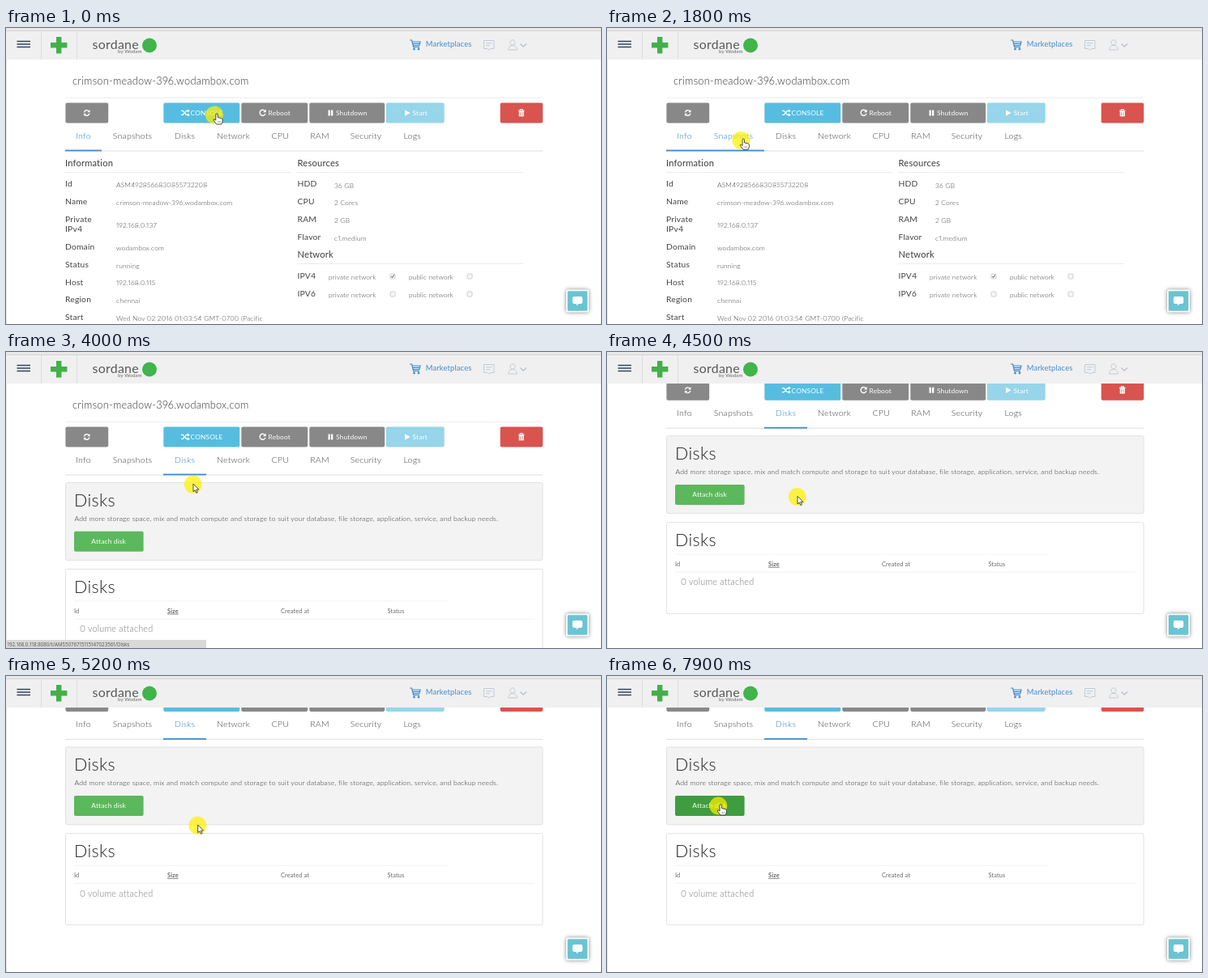
Recreate the animation shown at these times as an HTML page. Size 734 by 366 pixels, loop 8000 ms.

```html
<!DOCTYPE html>
<html lang="en">
<head>
<meta charset="utf-8">
<title>Machine console</title>
<style>
html, body { margin: 0; width: 100%; height: 100%; overflow: hidden; background: #fff; }
svg { display: block; width: 100vw; height: 100vh; }
text {
  font-family: Lato, "Open Sans", sans-serif;
  font-variant-numeric: proportional-nums;
  letter-spacing: .018em;
  white-space: pre;
}
.light { font-weight: 300; }
.glow { filter: drop-shadow(0 0 2.5px rgba(0, 0, 0, .5)); }
#bar text { font-family: "Open Sans", sans-serif; letter-spacing: 0; }
</style>
</head>
<body>
<svg id="stage" viewBox="0 0 734 366"></svg>
<script>
const LOOP = 8000;
const BLUE = '#428bca';
const TAB_BLUE = '#2f7fc4';
const GREEN = '#5cb85c';
const HOST = 'crimson-meadow-396.wodambox.com';
const LINK = '192.168.0.118:8080/t/AMS5076715115147023561/';

// Markup helpers
const text = (x, y, size, str, fill = '#555', more = '') =>
  `<text x="${x}" y="${y}" font-size="${size}" fill="${fill}" ${more}>${str}</text>`;
const light = (x, y, size, str, fill = '#555', more = '') =>
  text(x, y, size, str, fill, `class="light" ${more}`);
const rect = (x, y, w, h, fill, more = '') =>
  `<rect x="${x}" y="${y}" width="${w}" height="${h}" fill="${fill}" ${more}/>`;
const path = (d, stroke, width = 1, fill = 'none', more = '') =>
  `<path d="${d}" stroke="${stroke}" stroke-width="${width}" fill="${fill}" ${more}/>`;
const rule = (x1, x2, y, color = '#e8e8e8') => path(`M${x1} ${y}H${x2}`, color, .8);
const group = (id, body) => `<g id="${id}">${body}</g>`;
const $ = id => document.getElementById(id);

const TABS = [
  ['Info', 73, 118, 95.5], ['Snapshots', 118, 194, 156], ['Disks', 194, 247, 220.5],
  ['Network', 247, 314, 280.5], ['CPU', 314, 363, 338.3], ['RAM', 363, 412, 387],
  ['Security', 412, 477, 444], ['Logs', 477, 526, 501.3]
];

function refreshIcon(x, y) {
  return path(`M${x - 3.3} ${y - .7}a3.4 3.4 0 0 1 6-1.3M${x + 3.3} ${y + .7}a3.4 3.4 0 0 1-6 1.3`, '#fff', 1.3) +
    path(`M${x + 3.8} ${y - 4}v3.2h-3.2zM${x - 3.8} ${y + 4}v-3.2h3.2z`, 'none', 0, '#fff');
}

function buttons() {
  const box = (x1, x2, fill) => rect(x1, 92.6, x2 - x1, 25, fill, 'rx="2"');
  return box(73.4, 126.2, '#888') + box(194.3, 288.3, '#56bde0') + box(290.3, 372.2, '#888') +
    box(374.3, 467.2, '#888') + box(468.8, 540.7, '#96d5ea') + box(609.7, 662.2, '#d9534f') +
    refreshIcon(99.7, 105) +
    path('M216 102.4h2.2l4.4 5h2.2M216 107.4h2.2l4.4-5h2.2', '#fff', 1.3) +
    path('M224 100.2l2.8 2.2-2.8 2.2zM224 105.2l2.8 2.2-2.8 2.2z', 'none', 0, '#fff') +
    text(227.5, 108.4, 8.4, 'CONSOLE', '#fff') +
    path('M319.4 102.6a3.5 3.5 0 1 0 .6 3.3', '#fff', 1.4) +
    path('M320.7 100.5v3.7h-3.7z', 'none', 0, '#fff') +
    text(323.5, 108.4, 8.4, 'Reboot', '#fff') +
    rect(397.5, 101.5, 2.3, 7, '#fff') + rect(401, 101.5, 2.3, 7, '#fff') +
    text(407, 108.4, 8.4, 'Shutdown', '#fff') +
    path('M492 101.3l6.6 3.7-6.6 3.7z', 'none', 0, '#fff') +
    text(501.5, 108.4, 8.4, 'Start', '#fff') +
    path('M632 102.2h7.6M634.3 102v-1.3h3V102', '#fff', 1.1) +
    path('M632.7 103h6.2v6.3h-6.2z', 'none', 0, '#fff') +
    path('M634.6 104.2v4M637 104.2v4', '#d9534f', .7);
}

function infoPage() {
  const label = (x, y, str) => text(x, y - .5, 10.3, str, '#444');
  const value = (x, y, str) => light(x, y - .3, 8.45, str, '#444');
  const left = [
    ['Id', 196.5, 'ASM4928566830855732208', 197.7], ['Name', 218.5, HOST, 219.5],
    ['Private', 240.5, '192.168.0.137', 247.2], ['IPv4', 252, '', 0],
    ['Domain', 274.5, 'wodambox.com', 275.2], ['Status', 296.3, 'running', 297],
    ['Host', 318, '192.168.0.115', 318.7], ['Region', 339.8, 'chennai', 340.7],
    ['Start', 361.5, 'Wed Nov 02 2016 01:03:54 GMT-0700 (Pacific', 362], ['Time', 373, '', 0]
  ];
  const right = [['HDD', '36 GB'], ['CPU', '2 Cores'], ['RAM', '2 GB'], ['Flavor', 'c1.medium']];
  const check = (x, y) => rect(x - 3, y - 3, 6, 6, '#f6f6f6', 'stroke="#c4c4c4" stroke-width=".8" rx="1"');
  const net = (name, y) => label(359.5, y + 3.5, name) +
    light(398, y + 4, 8.25, 'private network', '#444') + check(477, y) +
    light(497, y + 4, 8.25, 'public network', '#444') + check(572, y);
  return text(73, 171, 11.1, 'Information', '#3d3d3d') + text(359.5, 171, 11.2, 'Resources', '#3d3d3d') +
    rule(73, 351, 178.5) + rule(359, 638, 178.5) +
    left.map(([a, y, b, v]) => label(73, y, a) + value(136, v, b)).join('') +
    right.map(([a, b], i) => label(359.5, 196.5 + 21.9 * i, a) + value(405, 197.8 + 21.8 * i, b)).join('') +
    text(359.5, 284.3, 11.2, 'Network', '#3d3d3d') + rule(359, 638, 291.5) +
    net('IPV4', 307) + net('IPV6', 329) +
    path('M475.3 307l1.3 1.5 2.2-3.2', '#555', 1);
}

function disksPage() {
  const panel = (y, h, fill) => rect(73.5, y, 588.5, h, fill, 'stroke="#e2e2e2" stroke-width="1" rx="2"');
  const head = (x, str, more) => text(x, 322.7, 7.4, str, '#666', more);
  return panel(161.5, 96, '#f3f3f3') + panel(268.5, 113, '#fff') +
    light(84, 190.7, 21.4, 'Disks', '#222') + light(84, 298.2, 21.4, 'Disks', '#222') +
    light(84.5, 209.2, 8.65, 'Add more storage space, mix and match compute and storage to suit your database, file storage, application, service, and backup needs.', '#333') +
    rect(84, 221.8, 85.6, 25, GREEN, 'id="attach" rx="2"') +
    text(126.7, 237, 8.4, 'Attach disk', '#fff', 'text-anchor="middle"') +
    rule(84, 545, 308, '#f0f0f0') + rule(84, 652, 330, '#eee') +
    head(84, 'Id') + head(199, 'Size', 'font-weight="700" text-decoration="underline"') +
    head(339, 'Created at') + head(470.5, 'Status') +
    light(91, 346.3, 10.8, '0 volume attached', '#777');
}

function header() {
  return rect(0, 0, 734, 39, '#f0f0f0') + rect(0, 0, 734, 3, '#e9e9e9') + rule(0, 734, 3.5, '#cfcfcf') +
    path('M43.5 4V39M87.5 4V39', '#dcdcdc', 1) +
    path('M13.5 16.5H30M13.5 20H30M13.5 23.5H30', '#34435a', 1.7) +
    path('M65.2 11V31.4M55 21.2H75.4', '#43b049', 6.4) +
    text(106.5, 25.7, 15.9, 'sordane', '#58595b') + text(138, 31.3, 6.1, 'by Wodam', '#666') +
    '<circle cx="177" cy="21.5" r="9" fill="#3fb54a"/>' +
    path('M498 15h2.6l2 8.5h7.4M501 17h10l-1.2 4.7h-7.7M501.5 19.3h9', BLUE, 1.2) +
    `<circle cx="503.5" cy="26" r="1.4" fill="${BLUE}"/><circle cx="509" cy="26" r="1.4" fill="${BLUE}"/>` +
    text(517.7, 23.4, 9.35, 'Marketplaces', BLUE) +
    path('M589.5 15.5h12.5v10h-4l-2.2 1.7-2.2-1.7h-4.1zM592 18.7h7.5M592 21.7h5', '#c3cbd6', 1) +
    path('M625 14.7a3 3.2 0 1 1-.1 0M619.7 27c0-4 2.5-5.5 5.3-5.5s5.3 1.5 5.3 5.5z', '#c3cbd6', 1) +
    path('M634.5 19.5l3.7 3.7 3.7-3.7', '#b5bfcc', 1.3);
}

function chat() {
  return rect(691, 323.5, 28, 28, '#fff', 'class="glow" rx="2.5"') +
    rect(692.7, 325.2, 24.6, 24.6, '#6ac4d2', 'rx="1"') +
    path('M701 332h8q2.2 0 2.2 2.2v4.5q0 2.2-2.2 2.2h-2.5l-2.7 2.7v-2.7H701q-2.2 0-2.2-2.2v-4.5q0-2.2 2.2-2.2z', 'none', 0, '#fff');
}

function pointer() {
  const halo = '<circle id="halo" r="10.9" fill="#fff000" opacity=".72"/>';
  const ring = '<circle id="ring" cx="-.8" cy="-1.2" r="9.3" fill="#fff" fill-opacity=".35" stroke="#a5a28a" stroke-width=".9"/>';
  const hand = path('M-1.2 1a1.2 1.2 0 0 1 2.4 0V4.6l4.3.9q1.7.4 1.6 2V9.8L5.8 13H-.3L-3.9 8.3q-.6-1.5.9-1.4l1.8 1.2z', '#222', .8, '#fff') +
    path('M2 9v2M4 9v2', '#444', .6);
  const arrow = path('M0 0V9.7l2.2-2 1.6 3.6 1.6-.7-1.6-3.5h3.1z', '#222', .8, '#fff');
  const beam = path('M-2-4.5H2M0-4.5V4.5M-2 4.5H2', '#222', 1.1);
  return group('cursor', halo + ring + group('hand', hand) + group('arrow', arrow) + group('beam', beam));
}

$('stage').innerHTML =
  rect(0, 0, 734, 366, '#fff') +
  group('page',
    light(82, 70, 12.8, HOST, '#333') + rule(73.5, 662, 86.3) + buttons() +
    TABS.map(([name, , , mid], i) => light(mid, 137, 10.6, name, '#444', `id="tab${i}" text-anchor="middle"`)).join('') +
    rule(73, 662, 152, '#d6d6d6') +
    TABS.map(([, a, b], i) => rect(a, 150.6, b - a, 1.8, BLUE, `id="line${i}"`)).join('') +
    group('info', infoPage()) + group('disks', disksPage())) +
  path('M.5 39V366', '#e8e8e8', 1) + header() +
  group('bar', rect(0, 356, 247, 10, '#d9d9d9') + text(1.5, 364, 6.2, '', '#555', 'id="url"')) +
  chat() + pointer();

// Pointer stops: time, x, y
const PATH = [
  [0, 260, 106], [300, 260, 106], [1700, 168.3, 137.3], [1900, 168.3, 137.3], [2500, 218.5, 135],
  [3900, 218.5, 135], [4000, 231, 163], [4700, 236, 182], [5500, 237, 185],
  [6200, 184, 271], [6600, 184, 271], [7500, 140.3, 159], [LOOP, 140.3, 159]
];
const HALO = { hand: [-3, 1.5], arrow: [-.3, .7], beam: [-5.5, -4] };

const ease = (t, a, b) => {
  const k = Math.min(1, Math.max(0, (t - a) / (b - a)));
  return k * k * (3 - 2 * k);
};

function pointAt(t) {
  const i = PATH.findIndex((p, n) => n && t <= p[0]);
  const [t0, x0, y0] = PATH[i - 1], [t1, x1, y1] = PATH[i];
  const k = ease(t, t0, t1);
  return [x0 + (x1 - x0) * k, y0 + (y1 - y0) * k];
}

const show = (id, on) => $(id).setAttribute('display', on ? 'inline' : 'none');

function draw(t) {
  const [x, y] = pointAt(t);
  const scroll = 57.8 * ease(t, 4150, 4450) + 15.9 * ease(t, 4850, 5150);
  const py = y + scroll;
  const onDisks = t >= 3300;
  const active = onDisks ? 2 : 0;
  const hover = py > 122 && py < 152 ? TABS.findIndex(([, a, b]) => x >= a && x < b) : -1;
  const onAttach = onDisks && x > 84 && x < 169.5 && py > 222 && py < 246.5;
  const onConsole = x > 194 && x < 288 && py > 93 && py < 117.5;
  const kind = hover >= 0 || onAttach || onConsole ? 'hand' : onDisks && py > 333 ? 'beam' : 'arrow';

  $('page').setAttribute('transform', `translate(0 ${-scroll})`);
  show('info', !onDisks);
  show('disks', onDisks);
  TABS.forEach((tab, i) => {
    const on = i === active || i === hover;
    $('tab' + i).setAttribute('fill', on ? TAB_BLUE : '#444');
    show('line' + i, on);
  });
  $('attach').setAttribute('fill', onAttach ? '#3f9d3f' : GREEN);

  show('bar', t >= 1900 && t < 4100);
  $('url').textContent = LINK + (hover === 1 ? 'Snapshots' : 'Disks');

  $('cursor').setAttribute('transform', `translate(${x} ${y})`);
  for (const id in HALO) show(id, id === kind);
  $('halo').setAttribute('cx', HALO[kind][0]);
  $('halo').setAttribute('cy', HALO[kind][1]);
  show('ring', t >= 6200 && t < 6500);
}

const start = performance.now();
function tick() {
  draw((performance.now() - start) % LOOP);
  requestAnimationFrame(tick);
}
tick();
</script>
</body>
</html>
```
